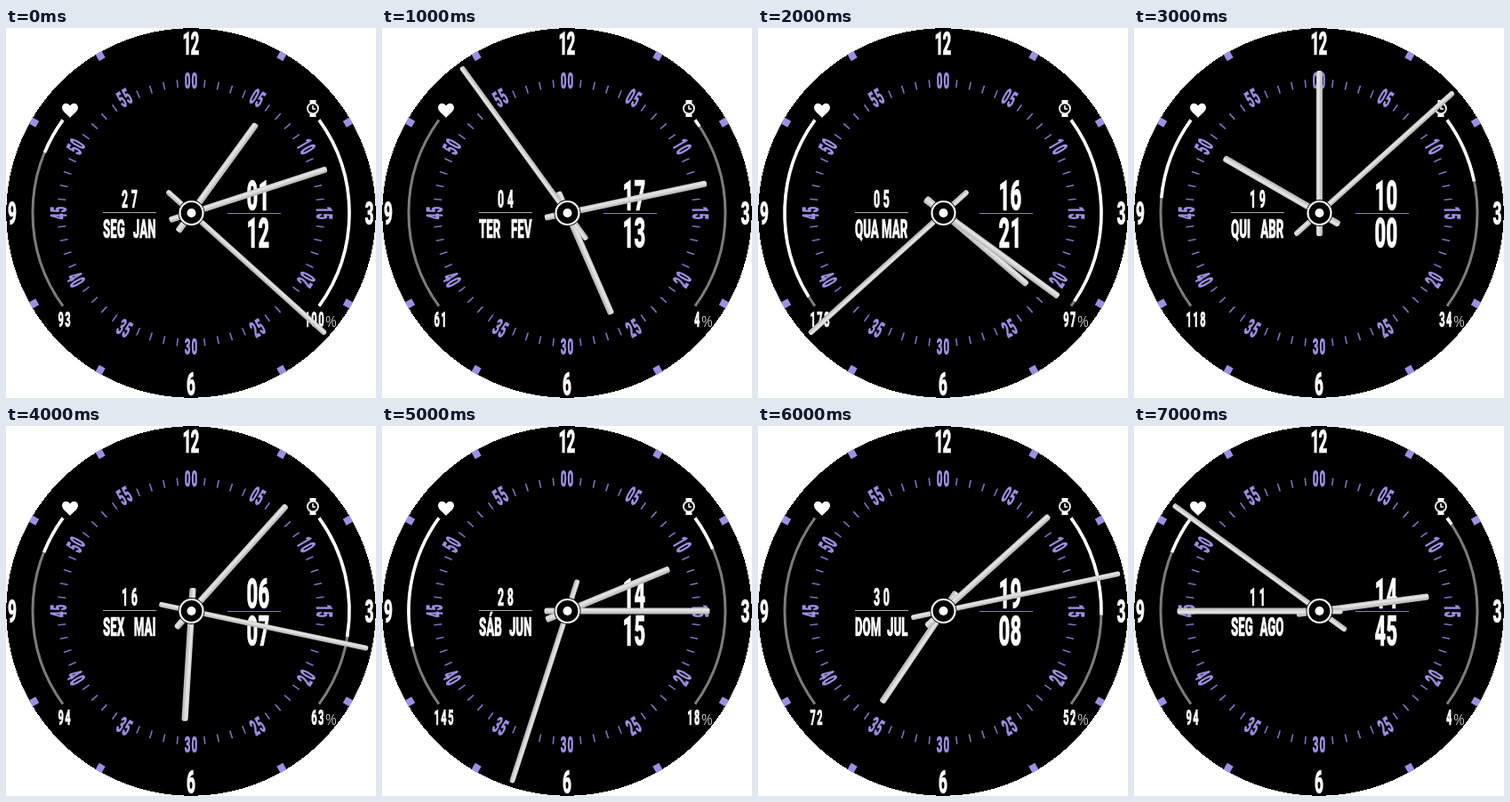
Write an HTML page that moves like this. It is 416 px wide and 416 px high and loops after 8000 ms.

```html
<!DOCTYPE html>
<html lang="pt">
<head>
<meta charset="utf-8">
<title>Watch face</title>
<style>
  html, body { margin: 0; width: 100%; height: 100%; overflow: hidden; background: #fff; }
  svg { display: block; width: 100%; height: 100%; }
  text { font-family: Roboto, "Liberation Sans", sans-serif; font-weight: 800; fill: currentColor;
         stroke: currentColor; stroke-width: .5; vector-effect: non-scaling-stroke; }
  text.unit { font: 300 16px "Open Sans", "Noto Sans", sans-serif; stroke: none; }
  #face { color: #fff; }
  #dial { color: #9d8fe2; }
  .track { fill: none; stroke: #7c7c7c; stroke-width: 3; }
  .level { fill: none; stroke: #fff; stroke-width: 3.6; }
</style>
</head>
<body>
<svg viewBox="0 0 416 416">
  <defs>
    <linearGradient id="metal">
      <stop offset="0" stop-color="#c4c4c4"/>
      <stop offset=".35" stop-color="#e8e8e8"/>
      <stop offset="1" stop-color="#b0b0b0"/>
    </linearGradient>
  </defs>
  <circle cx="208" cy="208" r="207.700" shape-rendering="crispEdges"/>
  <g id="face">
    <g id="dial"></g>
    <g id="gauges"></g>
    <path fill="#fff" d="M72 101C69 97 63 94 63 89.500C63 84 69.500 83 72 87.500C74.500 83 81 84 81 89.500C81 94 75 97 72 101Z"/>
    <g fill="none" stroke="#fff" stroke-width="1.800">
      <circle cx="345" cy="90.500" r="6"/>
      <path d="M345 87V91H348" stroke-width="1.500"/>
      <path d="M341.500 82.500H348.500M341.500 98.500H348.500" stroke-width="3"/>
    </g>
    <path d="M109 207.500H169" stroke="#aaa"/>
    <path d="M249 208.500H309" stroke="#8678dc"/>
    <g id="info"></g>
    <text class="unit" x="359" y="335.500">%</text>
  </g>
  <g id="hands"></g>
  <circle cx="208.500" cy="208" r="15"/>
  <circle cx="208.500" cy="208" r="13" fill="none" stroke="#fff" stroke-width="2.200"/>
  <circle cx="208.500" cy="208" r="5" fill="#fff"/>
</svg>
<script>
const C = 208, STEP = 1000, CONDENSED = .46;
const $ = id => document.getElementById(id);
const dial = $('dial'), info = $('info');

function add(parent, tag, attrs) {
  const el = document.createElementNS('http://www.w3.org/2000/svg', tag);
  for (const k in attrs) el.setAttribute(k, attrs[k]);
  return parent.appendChild(el);
}

// Condensed text of cap height h, standing on the local baseline
function label(parent, place, h, anchor = 'middle', gap = 0, str = '') {
  const shift = { start: 0, middle: gap / 2, end: gap }[anchor];
  const el = add(parent, 'text', {
    transform: `${place} translate(${shift} 0) scale(${CONDENSED} 1)`,
    'font-size': h / .711, 'text-anchor': anchor, 'letter-spacing': gap / CONDENSED
  });
  el.textContent = str;
  return el;
}
const at = (x, y) => `translate(${x} ${y})`;

function polar(deg, r) {
  const a = deg * Math.PI / 180;
  return [C + r * Math.sin(a), C - r * Math.cos(a)];
}

function spoke(deg, r1, r2, width, color) {
  add(dial, 'path', { d: `M${polar(deg, r1)}L${polar(deg, r2)}`, stroke: color, 'stroke-width': width });
}

for (let m = 0; m < 60; m++) {
  const deg = m * 6;
  if (m % 5) { spoke(deg, 141.5, 150.5, 1.6, '#7c70bc'); continue; }
  const lean = m > 15 && m < 45 ? deg - 180 : deg;
  const place = `${at(...polar(deg, 149.5))} rotate(${lean}) translate(0 9)`;
  label(dial, place, 18, 'middle', .8, String(m).padStart(2, '0'));
  if (m % 15) spoke(deg, 199.5, 208, 8, 'currentColor');
}

label(info, at(208, 30), 26.5, 'middle', -.8, '12');
label(info, at(408.5, 221), 26.5, 'middle', 0, '3');
label(info, at(208, 412.5), 26.5, 'middle', 0, '6');
label(info, at(7, 221), 26.5, 'middle', 0, '9');

const out = {
  hour: label(info, at(283.3, 205), 34, 'middle', .3),
  min: label(info, at(283.3, 247), 34, 'middle', .3),
  date: label(info, at(139, 202), 19, 'middle', 3.6),
  dow: label(info, at(109, 236), 20.5, 'start'),
  month: label(info, at(168.5, 236), 20.5, 'end'),
  pulse: label(info, at(58.5, 335.5), 17, 'start', 1.5),
  power: label(info, at(357.5, 335.5), 17, 'end', 1.5)
};

// Side gauges run 72 degrees from top to bottom
function gauge(side) {
  const d = `M${polar(side * 54, 178)}A178 178 0 0 ${side > 0 ? 1 : 0} ${polar(side * 126, 178)}`;
  add($('gauges'), 'path', { d, class: 'track' });
  return add($('gauges'), 'path', { d, class: 'level', pathLength: 100 });
}
const pulseBar = gauge(-1), powerBar = gauge(1);

function fill(bar, pct) {
  bar.style.display = pct ? '' : 'none';
  bar.setAttribute('stroke-dasharray', `${pct} 200`);
}

function hand(len, tail, width) {
  return add($('hands'), 'rect', {
    x: -width / 2, y: -len, width, height: len + tail, rx: 2.5, fill: 'url(#metal)'
  });
}
const hourHand = hand(124, 26, 7.3), minHand = hand(160, 26, 7), secHand = hand(203, 37, 6);
const turn = (el, deg) => el.setAttribute('transform', `translate(208.5 208) rotate(${deg})`);

// hour, minute, second, date, weekday, month, pulse, battery
const states = [
  '01 12 22 27 SEG JAN 93 100',
  '17 13 54 04 TER FEV 61 4',
  '16 21 38 05 QUA MAR 173 97',
  '10 00 08 19 QUI ABR 118 34',
  '06 07 17 16 SEX MAI 94 63',
  '14 15 33 28 SÁB JUN 145 18',
  '19 08 13 30 DOM JUL 72 52',
  '14 45 51 11 SEG AGO 94 4'
].map(s => s.split(' '));

function show([hour, min, sec, date, dow, month, pulse, power]) {
  const values = { hour, min, date, dow, month, pulse, power };
  for (const k in values) out[k].textContent = values[k];
  turn(hourHand, hour * 30 + min / 2);
  turn(minHand, min * 6);
  turn(secHand, sec * 6);
  fill(pulseBar, Math.max(0, (pulse - 73) / 1.06));
  fill(powerBar, +power);
}

let shown = -1;
const start = performance.now();
function tick() {
  const i = Math.floor((performance.now() - start) / STEP) % states.length;
  if (i !== shown) show(states[shown = i]);
  requestAnimationFrame(tick);
}
tick();
</script>
</body>
</html>
```
